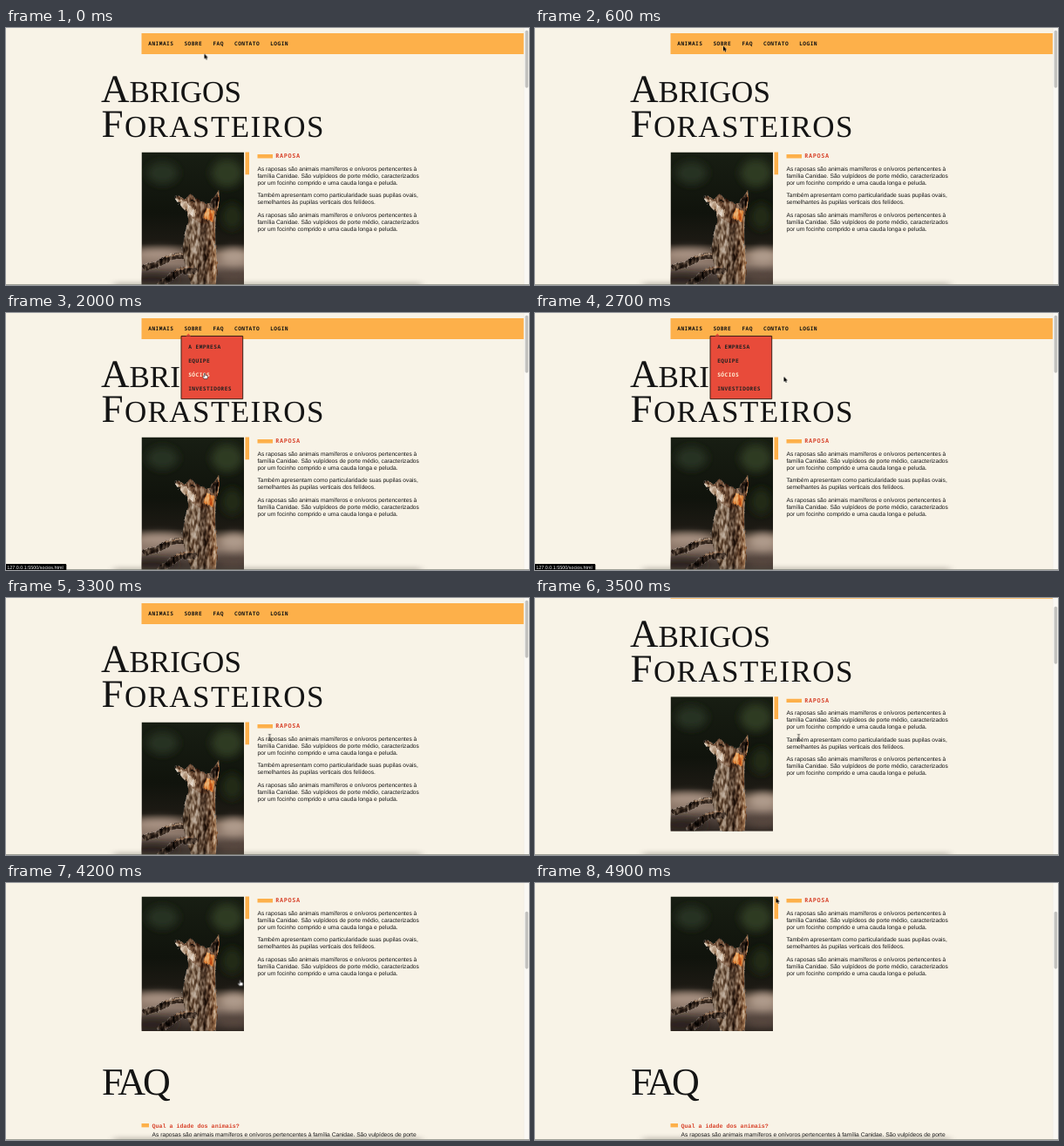
These frames come from a looping animation (600x295 px, 5 s). An HTML page:

```html
<!DOCTYPE html>
<html lang="pt-BR">
<head>
<meta charset="utf-8">
<title>Abrigos Forasteiros</title>
<style>
  @property --scroll { syntax: "<length>"; inherits: true; initial-value: 0px; }

  html, body { margin: 0; width: 100%; height: 100%; overflow: hidden; background: #f8f3e7; }
  svg { display: block; width: 100vw; height: 100vh; animation: scroll 5s step-end infinite; }
  text { white-space: pre; text-rendering: geometricPrecision; fill: #141414; }

  .page { transform: translateY(calc(var(--scroll) * -1)); }
  .thumb { transform: translateY(calc(var(--scroll) * .235)); }

  .nav text { font: 700 6.2px "Noto Sans Mono", "Liberation Mono", monospace; letter-spacing: .44px; }
  .tag { font: 700 6.8px "Noto Sans Mono", "Liberation Mono", monospace; letter-spacing: .66px; fill: #d8432b; }
  .ask { font: 700 6.7px "Liberation Mono", monospace; fill: #d8432b; }
  .body { font: 6.667px "Liberation Sans", Arial, sans-serif; }
  .title { font: 35px "Liberation Serif", serif; }
  .cap { font-size: 45px; }
  .status text { font: 5.4px "Liberation Sans", Arial, sans-serif; fill: #fff; }
  .orange { fill: #fdb04a; }

  .menu, .status g, .arrow, .hand, .beam { opacity: 0; animation: 5s step-end infinite; }
  .item { animation: 5s step-end infinite; }
  .menu { animation-name: menu; }
  .item.a { animation-name: hover-a; }
  .item.b { animation-name: hover-b; }
  .item.c { animation-name: hover-c; }
  .item.d { animation-name: hover-d; }
  .status .s { animation-name: link-s; }
  .status .a { animation-name: link-a; }
  .status .b { animation-name: link-b; }
  .status .c { animation-name: link-c; }
  .status .d { animation-name: link-d; }
  .arrow { animation-name: arrow; }
  .hand { animation-name: hand; }
  .beam { animation-name: beam; }
  .cursor { animation: move 5s step-end infinite; }
  .faq { animation: reveal 5s step-end infinite; }

  @keyframes scroll {
    0% { --scroll: 0px; }
    68% { --scroll: 8px; }
    70% { --scroll: 29.3px; }
    72% { --scroll: 95px; }
    74% { --scroll: 159px; }
    76% { --scroll: 172px; animation-timing-function: steps(4); }
    84%, 100% { --scroll: 127px; }
  }
  @keyframes reveal {
    0% { opacity: 0; transform: translateX(-8px); }
    74% { opacity: 0; transform: translateX(-8px); animation-timing-function: steps(3); }
    80%, 100% { opacity: 1; transform: none; }
  }

  @keyframes menu { 0%, 56% { opacity: 0; } 14% { opacity: 1; } }
  @keyframes hover-a { 0%, 34% { fill: #222; } 28% { fill: #fff3d8; } }
  @keyframes hover-b { 0%, 40% { fill: #222; } 34% { fill: #fff3d8; } }
  @keyframes hover-c { 0%, 46%, 56% { fill: #222; } 40%, 50% { fill: #fff3d8; } }
  @keyframes hover-d { 0%, 50% { fill: #222; } 46% { fill: #fff3d8; } }
  @keyframes link-s { 0%, 28% { opacity: 0; } 16% { opacity: 1; } }
  @keyframes link-a { 0%, 34% { opacity: 0; } 28% { opacity: 1; } }
  @keyframes link-b { 0%, 40% { opacity: 0; } 34% { opacity: 1; } }
  @keyframes link-c { 0%, 46%, 62% { opacity: 0; } 40%, 50% { opacity: 1; } }
  @keyframes link-d { 0%, 50% { opacity: 0; } 46% { opacity: 1; } }

  @keyframes arrow { 0%, 54%, 72%, 98%, 100% { opacity: 1; } 14%, 66%, 82% { opacity: 0; } }
  @keyframes hand { 0%, 54%, 98%, 100% { opacity: 0; } 14%, 82% { opacity: 1; } }
  @keyframes beam { 0%, 72%, 100% { opacity: 0; } 66% { opacity: 1; } }
  @keyframes move {
    0% { transform: translate(227.5px, 29.5px); animation-timing-function: steps(7); }
    14% { transform: translate(214px, 19px); animation-timing-function: steps(5); }
    24% { transform: translate(212.5px, 21.5px); animation-timing-function: steps(2); }
    28% { transform: translate(222px, 37px); animation-timing-function: steps(3); }
    34% { transform: translate(226px, 53px); animation-timing-function: steps(3); }
    40% { transform: translate(228px, 69px); animation-timing-function: steps(3); }
    46% { transform: translate(236px, 85px); animation-timing-function: steps(2); }
    50% { transform: translate(250px, 72px); animation-timing-function: steps(2); }
    54% { transform: translate(285.5px, 73px); animation-timing-function: steps(4); }
    62% { transform: translate(300px, 125px); animation-timing-function: steps(2); }
    66%, 70% { transform: translate(302.5px, 160px); animation-timing-function: steps(2); }
    74% { transform: translate(300.5px, 172px); animation-timing-function: steps(2); }
    78% { transform: translate(294px, 150px); animation-timing-function: steps(3); }
    84% { transform: translate(268.5px, 111.5px); animation-timing-function: steps(6); }
    96% { transform: translate(271px, 40px); }
    98%, 100% { transform: translate(276.5px, 17px); }
  }
</style>
</head>
<body>
<svg viewBox="0 0 600 295" preserveAspectRatio="none">
  <defs>
    <linearGradient id="woods" x2="0" y2="1">
      <stop offset="0" stop-color="#181e13"/>
      <stop offset=".45" stop-color="#10130c"/>
      <stop offset=".68" stop-color="#1d1a14"/>
      <stop offset=".76" stop-color="#86705f"/>
      <stop offset=".83" stop-color="#8a7669"/>
      <stop offset=".9" stop-color="#554740"/>
      <stop offset="1" stop-color="#2e2621"/>
    </linearGradient>
    <linearGradient id="fur">
      <stop offset="0" stop-color="#54402f"/>
      <stop offset=".3" stop-color="#806750"/>
      <stop offset=".65" stop-color="#513a2a"/>
      <stop offset=".88" stop-color="#7d583b"/>
      <stop offset="1" stop-color="#b58a63"/>
    </linearGradient>
    <filter id="soft" x="-50%" y="-50%" width="200%" height="200%"><feGaussianBlur stdDeviation="5"/></filter>
    <filter id="fuzz" x="-10%" y="-10%" width="120%" height="120%" color-interpolation-filters="sRGB">
      <feTurbulence type="fractalNoise" baseFrequency=".28 .12" numOctaves="2" seed="4" result="noise"/>
      <feDisplacementMap in="SourceGraphic" in2="noise" scale="4" xChannelSelector="R" yChannelSelector="G" result="rough"/>
      <feColorMatrix in="noise" values="2.4 0 0 0 -.7  2.4 0 0 0 -.7  2.4 0 0 0 -.7  0 0 0 0 1" result="grain"/>
      <feBlend in="grain" in2="rough" mode="soft-light"/>
      <feComposite operator="in" in2="rough"/>
    </filter>
    <filter id="dock" x="-10%" y="-200%" width="120%" height="500%"><feGaussianBlur stdDeviation="4 2"/></filter>
    <clipPath id="photo"><path d="M0 0H117.5V154.5H0Z"/></clipPath>
  </defs>

  <rect width="600" height="295" fill="#f8f3e7"/>

  <g class="page">
    <path class="orange" d="M155.5 6H594V30H155.5Z"/>
    <g class="nav">
      <text x="163.3" y="20.2">ANIMAIS</text>
      <text x="204.4" y="20.2">SOBRE</text>
      <text x="237.4" y="20.2">FAQ</text>
      <text x="262" y="20.2">CONTATO</text>
      <text x="303.2" y="20.2">LOGIN</text>
    </g>

    <text class="title" x="109" y="85"><tspan class="cap">A</tspan>BRIGOS</text>
    <text class="title" x="109.5" y="125" letter-spacing="1.4"><tspan class="cap">F</tspan>ORASTEIROS</text>

    <g transform="translate(155.5 142.5)">
      <g clip-path="url(#photo)">
        <path fill="url(#woods)" d="M0 0H117.5V154.5H0Z"/>
        <g filter="url(#soft)">
          <ellipse cx="24" cy="24" rx="18" ry="13" fill="#273020"/>
          <ellipse cx="98" cy="24" rx="18" ry="16" fill="#2e3a22"/>
          <ellipse cx="104" cy="74" rx="12" ry="15" fill="#222a18"/>
          <ellipse cx="20" cy="117" rx="26" ry="6" fill="#ab9587"/>
          <ellipse cx="106" cy="120" rx="16" ry="9" fill="#b09c8d"/>
          <ellipse cx="12" cy="147" rx="30" ry="7" fill="#2c241e"/>
          <ellipse cx="106" cy="144" rx="18" ry="5" fill="#5a4a41"/>
        </g>
        <g filter="url(#fuzz)">
          <path d="M53 120Q38 117 27 124T4 132" fill="none" stroke="#33251c" stroke-width="7" stroke-linecap="round"/>
          <path d="M52 118Q38 115 27 121" fill="none" stroke="#96775d" stroke-width="2"/>
          <path d="M52 66Q55 82 50 95Q44 110 50 130L57 155H85Q88 128 85 106Q84 86 86 66L70 56Z" fill="url(#fur)"/>
          <path d="M56 72Q61 86 55 102Q53 118 60 138Q70 118 65 100Q69 84 66 74Z" fill="#a68e78" opacity=".5"/>
          <path d="M60 136Q45 134 36 142T23 150" fill="none" stroke="#2a1e17" stroke-width="8" stroke-linecap="round"/>
          <path d="M60 132Q46 131 37 138" fill="none" stroke="#8d6c52" stroke-width="2"/>
          <path d="M38 51L43 50L49 54L57 48L64 55L77 60L88.5 44Q91 57 86 68L82 80Q68 86 57 74L46 63Z" fill="#6b4a33"/>
          <path d="M39 53L51 57L63 68L60 75L47 64Z" fill="#c9b29b"/>
          <path d="M75 64Q81 65 84 68L82 79Q76 80 71 75Z" fill="#d88038"/>
          <path d="M78 60L87.5 47Q88 58 83 65Z" fill="#2d2018"/>
          <path d="M87.5 46Q90 57 86 67" fill="none" stroke="#b8875c" stroke-width="1.2"/>
          <circle cx="39.5" cy="51.5" r="1.7" fill="#16110e"/>
          <path d="M56 55L61 57" stroke="#17100b" stroke-width="1.5"/>
        </g>
      </g>
    </g>
    <path class="orange" d="M274.5 142.5H279V168.3H274.5ZM288.5 145H306V149.4H288.5Z"/>
    <text class="tag" x="309.2" y="149.3">RAPOSA</text>
    <text class="body" id="par" x="288.5" y="163.7">As raposas são animais mamíferos e onívoros pertencentes à<tspan x="288.5" dy="8">família Canidae. São vulpídeos de porte médio, caracterizados</tspan><tspan x="288.5" dy="8">por um focinho comprido e uma cauda longa e peluda.</tspan></text>
    <text class="body" x="288.5" y="194.2">Também apresentam como particularidade suas pupilas ovais,<tspan x="288.5" dy="8">semelhantes às pupilas verticais dos felídeos.</tspan></text>
    <use href="#par" y="53"/>

    <g class="faq">
      <text class="title" x="110" y="370" style="font-size:44px;letter-spacing:-3px">FAQ</text>
      <path class="orange" d="M155.5 403H164V407.4H155.5Z"/>
      <text class="ask" x="167.4" y="407.8">Qual a idade dos animais?</text>
      <text class="body" x="167.6" y="418.2">As raposas são animais mamíferos e onívoros pertencentes à família Canidae. São vulpídeos de porte<tspan x="167.6" dy="8">médio, caracterizados por um focinho comprido e uma cauda longa e peluda.</tspan></text>
    </g>

    <g class="menu nav">
      <path d="M201 26.5H271.7V98.7H201Z" fill="#e84b3a" stroke="#3a2018" stroke-width="1"/>
      <path d="M206.5 26.6L209.3 23.6L212 26.6Z" fill="#e84b3a"/>
      <text class="item a" x="209.2" y="41.1">A EMPRESA</text>
      <text class="item b" x="209.2" y="56.9">EQUIPE</text>
      <text class="item c" x="209.2" y="72.8">SÓCIOS</text>
      <text class="item d" x="209.2" y="88.6">INVESTIDORES</text>
    </g>
  </g>

  <path d="M594 0H600V295H594Z" fill="#faf8f3"/>
  <path d="M594.2 0V295" stroke="#ece8de" stroke-width=".5"/>
  <rect class="thumb" x="595.6" y="2.8" width="3.6" height="66" rx="1.8" fill="#c2c1be"/>

  <rect x="124" y="291.5" width="352" height="6" fill="#6d655c" opacity=".3" filter="url(#dock)"/>
  <path d="M0 294.2H600V295H0Z" fill="#82847d"/>

  <g class="status">
    <g class="s"><path d="M0 288H66Q67.3 288 67.3 289.3V295H0Z"/><text x="1.3" y="293.5">127.0.0.1:5500/sobre.html</text></g>
    <g class="a"><path d="M0 288H74Q75.3 288 75.3 289.3V295H0Z"/><text x="1.3" y="293.5">127.0.0.1:5500/empresa.html</text></g>
    <g class="b"><path d="M0 288H69Q70.3 288 70.3 289.3V295H0Z"/><text x="1.3" y="293.5">127.0.0.1:5500/equipe.html</text></g>
    <g class="c"><path d="M0 288H68Q69.3 288 69.3 289.3V295H0Z"/><text x="1.3" y="293.5">127.0.0.1:5500/socios.html</text></g>
    <g class="d"><path d="M0 288H82Q83.3 288 83.3 289.3V295H0Z"/><text x="1.3" y="293.5">127.0.0.1:5500/investidores.html</text></g>
  </g>

  <g class="cursor">
    <path class="arrow" d="M0 0V6L1.4 4.8L2.4 7L3.3 6.6L2.4 4.5H4.2Z" stroke="#fff" stroke-width=".5" paint-order="stroke"/>
    <path class="hand" d="M-.6 .5Q0 -.3 .6 .5V2.4L2.6 2.8Q3.6 3 3.5 4L3 6.6H-.8L-2.4 4.2Q-2.4 3.2 -1.5 3.6L-.6 4.4Z" fill="#fff" stroke="#222" stroke-width=".6"/>
    <path class="beam" d="M-1.4 -3.6Q0 -3.6 0 -2.8Q0 -3.6 1.4 -3.6M0 -2.8V2.8M-1.4 3.6Q0 3.6 0 2.8Q0 3.6 1.4 3.6M-.8 .9H.8" fill="none" stroke="#222" stroke-width=".7"/>
  </g>
</svg>
</body>
</html>
```
